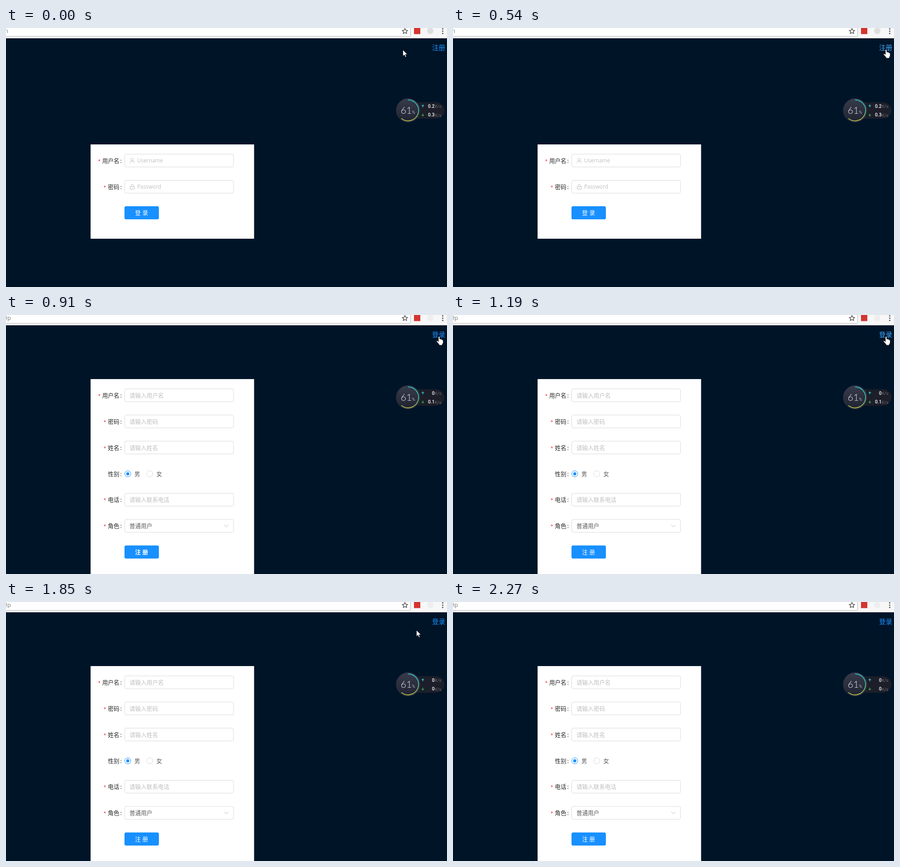
Recreate the animation shown at these times as an HTML page. Size 975 by 574 pixels, loop 2.82 s.

```html
<!DOCTYPE html>
<html lang="zh-CN">
<head>
<meta charset="utf-8">
<title>登录 / 注册</title>
<style>
  html, body { margin: 0; height: 100%; overflow: hidden; background: #001428; }
  svg { display: block; }
  text { font: 12.6px "Noto Sans CJK SC", "Noto Sans CJK", sans-serif; white-space: pre; }
  .label { fill: #262626; text-anchor: end; }
  .star { font-family: "Liberation Mono", monospace; fill: #f5222d; text-anchor: middle; }
  .hint { fill: #bfbfbf; }
  .latin { font: 11.8px "Open Sans", sans-serif; }
  .value { fill: #595959; }
  .box { fill: #fff; stroke: #d9d9d9; }
  .line { fill: none; stroke: #bfbfbf; }
  .btn { fill: #fff; letter-spacing: 3.6px; }
  .url { font: 13px "Open Sans", sans-serif; fill: #777; text-anchor: end; }
  #link { font-size: 14.6px; }
  .big { font: 300 21.5px Lato, sans-serif; fill: #e4e6ea; }
  .rate { font: 500 10.2px Roboto, sans-serif; fill: #fff; text-anchor: end; }
  .unit { font: 300 9.6px Roboto, sans-serif; fill: #8b8d94; }
  .pointer { fill: #fff; stroke: #000; stroke-width: .8; stroke-linejoin: round; }
</style>
</head>
<body>
<svg width="975" height="574" viewBox="0 0 975 574">
  <defs>
    <linearGradient id="ring" x1="0" y1="0" x2="0" y2="1">
      <stop offset="0" stop-color="#2bc5d2"/>
      <stop offset=".5" stop-color="#43c4a4"/>
      <stop offset="1" stop-color="#c0c44c"/>
    </linearGradient>
    <linearGradient id="ball" x1="0" y1="0" x2="0" y2="1">
      <stop offset="0" stop-color="#373b4b"/>
      <stop offset="1" stop-color="#202330"/>
    </linearGradient>
  </defs>

  <rect width="975" height="574" fill="#001428"/>

  <!-- browser toolbar -->
  <rect width="975" height="23" fill="#f8f7f8"/>
  <path d="M0 22.5H975" stroke="#c4c2c4"/>
  <path d="M-1 -1H894.5V16.5Q894.5 18.5 892.5 18.5H-1Z" fill="#fff" stroke="#b5b3b5"/>
  <text id="url" class="url" y="11"/>
  <path d="M882 1.2l1.7 3.7 4.1.5-3 2.8.8 4-3.6-2-3.6 2 .8-4-3-2.8 4.1-.5z" fill="none" stroke="#4c4c4c" stroke-width="1.4"/>
  <rect x="902" width="14" height="13.5" fill="#d5342f"/>
  <circle id="ext" cx="938" cy="6.5" r="7"/>
  <g fill="#555"><circle cx="965.5" cy="2" r="1.6"/><circle cx="965.5" cy="7" r="1.6"/><circle cx="965.5" cy="12" r="1.6"/></g>

  <text id="link" x="942" y="49"/>
  <g id="login"></g>
  <g id="signup"></g>

  <!-- speed widget -->
  <path d="M900 164.500H951a18 18 0 0 1 0 36.500H900Z" fill="#1c1e29"/>
  <circle cx="889" cy="182.500" r="26" fill="url(#ball)" stroke="#3c404d" stroke-width=".8"/>
  <path d="M889 159.300A23.200 23.200 0 1 1 874.100 200.300" fill="none" stroke="url(#ring)" stroke-width="1.700"/>
  <text class="big" x="872.500" y="190">61</text>
  <text class="unit" x="897.500" y="190" style="fill:#dde">%</text>
  <path d="M921.500 176v-5.500m-2.500 2.500l2.500-2.500 2.500 2.500" fill="none" stroke="#35b9d6" stroke-width="1.300"/>
  <path d="M921.500 189.500v5.500m-2.500-2.500l2.500 2.500 2.500-2.500" fill="none" stroke="#2fa84f" stroke-width="1.300"/>
  <text id="up" class="rate" x="947.500" y="176.500"/>
  <text id="down" class="rate" x="947.500" y="196"/>
  <text class="unit" x="948" y="177">K/s</text>
  <text class="unit" x="948" y="196.500">K/s</text>

  <path id="arrow" class="pointer" d="M.4 .4V14.400L3.700 11.400L5.900 16.600L8.200 15.600L6 10.700H10.600Z"/>
  <path id="hand" class="pointer" d="M5 2Q5 .5 6.500 .5T8 2V6.500Q8.500 5.500 10 6T10.700 7.200Q11.500 6.300 12.800 7T13.300 8.200Q15.600 7.400 15.600 10V13Q15.600 16 13.600 18V20H6.500V18.200L1.200 12.200Q.2 10.600 1.500 10T5 12Z"/>
</svg>
<script>
const $ = id => document.getElementById(id);

const text = (cls, x, mid, str, id = "") =>
  `<text id="${id}" class="${cls}" x="${x}" y="${mid + 4.7}">${str}</text>`;

const label = (mid, str, required = true) =>
  text("label", 250.5, mid, str) + text("label", 256, mid, ":") +
  (required ? `<text class="star" x="${245 - str.length * 12.6 + (str.length > 2 ? -1 : -1.2)}" y="${mid + 5.5}">*</text>` : "");

const box = mid => `<rect class="box" x="262.5" y="${mid - 14.5}" width="240.500" height="28.500" rx="3.600"/>`;

const field = (mid, name, hint) => label(mid, name) + box(mid) + text("hint", 273, mid, hint);

const button = (mid, str, id) =>
  `<rect x="262" y="${mid - 14.5}" width="76" height="29" rx="3.600" fill="#1890ff"/>` +
  text("btn", 285.3, mid, str, id);

const card = (y, h) => `<rect x="187" y="${y}" width="361.500" height="${h}" fill="#fff"/>`;

const radio = (x, on, str) =>
  `<circle cx="${x}" cy="352" r="6.700" fill="#fff" stroke="${on ? "#1890ff" : "#d9d9d9"}"/>` +
  (on ? `<circle cx="${x}" cy="352" r="3.500" fill="#1890ff"/>` : "") +
  text("value", x + 14.6, 352, str);

$("login").innerHTML = card(258, 209) +
  label(294, "用户名") + box(294) + text("hint latin", 290, 293.6, "Username") +
  `<path class="line" d="M274 299.500Q274.300 295 279 295T284.300 299.500"/><circle class="line" cx="279" cy="292" r="3"/>` +
  label(352, "密码") + box(352) + text("hint latin", 290, 351.6, "Password") +
  `<path class="line" d="M274.500 351.500H284V357H274.500ZM276.500 351.500V349Q276.500 346.800 279.250 346.800T282 349V351.500M279.250 353.500V355.200"/>` +
  button(409.5, "登录", "loginText");

$("signup").innerHTML = card(142, 432) +
  field(178.3, "用户名", "请输入用户名") +
  field(236.2, "密码", "请输入密码") +
  field(294, "姓名", "请输入姓名") +
  label(352, "性别", false) + radio(269.2, true, "男") + radio(318, false, "女") +
  field(409.6, "电话", "请输入联系电话") +
  label(467.5, "角色") + box(467.5) + text("value", 273, 467.5, "普通用户") +
  `<path class="line" d="M482.500 464.800L487 469.800L491.500 464.800"/>` +
  button(525.3, "注册", "signupText");

// [start ms, pointer, x, y]
const pointerSteps = [
  [0, "arrow", 877, 48], [120, "arrow", 935, 33], [240, "arrow", 967, 56],
  [390, "hand", 956, 51], [540, "hand", 951, 47],
  [1490, "arrow", 938, 61], [1850, "arrow", 907, 62],
  [2000, "arrow", 925, 180], [2120, "arrow", 957, 383], [2270, "none", 0, 0]
];
const linkColors = [
  [0, "#1890ff"], [540, "#40a9ff"], [910, "#2094ff"],
  [1060, "#309dff"], [1190, "#40a9ff"], [1610, "#1890ff"]
];

const at = (steps, t) => steps.findLast(s => s[0] <= t);

function draw(now) {
  const t = now % 2820;
  const signup = t >= 910, routed = t >= 790;
  const [, kind, x, y] = at(pointerSteps, t);

  for (const id of ["arrow", "hand"]) {
    $(id).style.display = id === kind ? "" : "none";
    $(id).setAttribute("transform", `translate(${x} ${y})`);
  }
  $("login").style.display = signup ? "none" : "";
  $("signup").style.display = signup ? "" : "none";
  $("signupText").style.fontWeight = t < 1060 ? 700 : 400;
  $("link").textContent = signup ? "登录" : "注册";
  $("link").setAttribute("fill", at(linkColors, t)[1]);
  $("url").textContent = routed ? "Up" : "n";
  $("url").setAttribute("x", routed ? 11 : 5);
  $("ext").setAttribute("fill", routed ? "#efeeef" : "#dededf");
  $("up").textContent = signup ? "0" : "0.2";
  $("down").textContent = t >= 1850 ? "0" : signup ? "0.1" : "0.3";
}

const start = performance.now();
(function loop() {
  draw(performance.now() - start);
  requestAnimationFrame(loop);
})();
</script>
</body>
</html>
```
